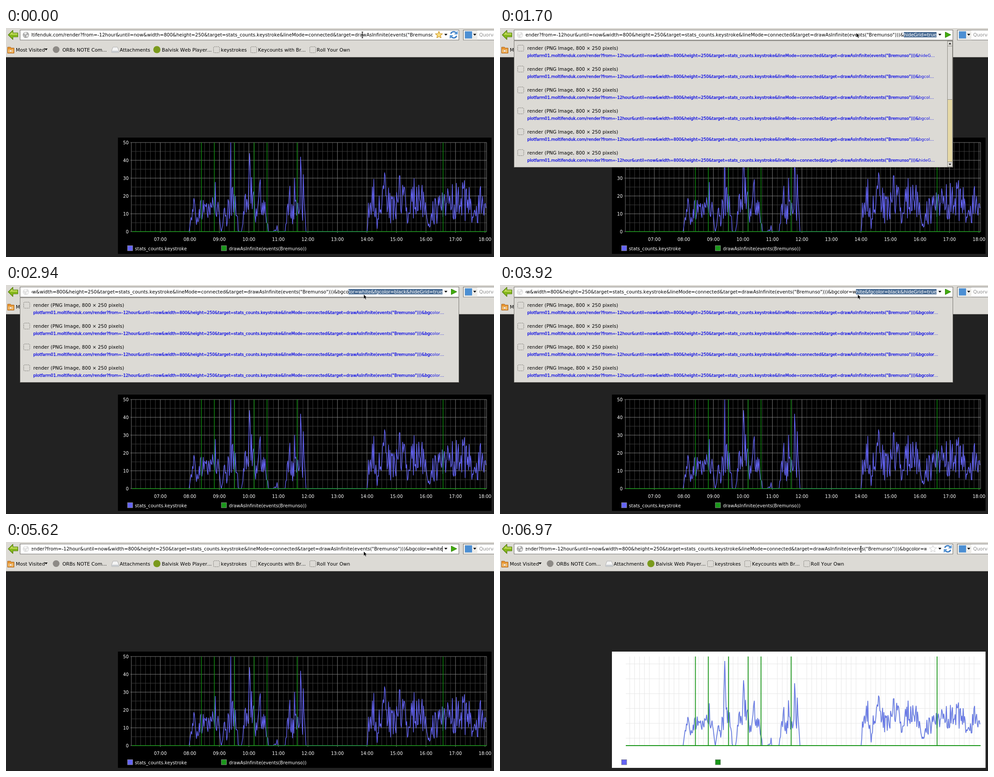
Animation, 1090 px wide and 514 px high, one loop 8 s. Source, as an HTML page:

```html
<!DOCTYPE html>
<html lang="en">
<head>
<meta charset="utf-8">
<title>Render URL editing</title>
<style>
  html, body { margin: 0; width: 100%; height: 100%; overflow: hidden; background: #222; }
  body { position: relative; font-family: "DejaVu Sans", sans-serif; font-kerning: none; font-variant-ligatures: none; }
  svg { position: absolute; left: 0; top: 0; }
  svg text { white-space: pre; }
  #url { position: absolute; left: 57px; top: 8px; height: 15px; overflow: hidden; font-size: 10.45px; line-height: 15px; color: #000; }
  #line { position: absolute; top: 0; white-space: pre; }
  #line .tail { letter-spacing: -.12px; }
  #line .sel { background: #4b6d94; color: #fff; }
  #caret { position: absolute; left: 974px; top: 9px; width: 1px; height: 13px; background: #000; }
  #pop { position: absolute; left: 31px; top: 28px; width: 981px; overflow: hidden; background: #dcdad5; box-shadow: inset 0 0 0 1px #77756f; }
  #pop div { position: absolute; left: 30px; line-height: 14px; white-space: pre; }
  #pop .title { font-size: 10.6px; color: #000; }
  #pop .addr { font-size: 9.117px; color: #0808e6; }
  #pop b { font-weight: 400; -webkit-text-stroke: .32px #0808e6; }
</style>
</head>
<body>
<svg id="stage" width="1090" height="514"></svg>
<div id="url"><span id="line"></span></div>
<div id="caret"></div>
<div id="pop"></div>
<svg id="mouse" width="1090" height="514">
  <path id="arrow" d="M0 0V10L2.3 8 4 11.6 5.7 10.8 4.1 7.4H7.2Z" stroke="#fff" stroke-width=".5"/>
  <path id="beam" d="M-2 -6.5H-.6L0 -6 .6 -6.5H2M0 -6V6M-2 6.5H-.6L0 6 .6 6.5H2" fill="none" stroke="#000" stroke-width="1.2"/>
</svg>
<script>
const LOOP = 8000;
const BASE = 'plotfarm01.moltifenduk.com/render?from=-12hour&until=now&width=800&height=250' +
  '&target=stats_counts.keystroke&lineMode=connected&target=drawAsInfinite(events("Bremunso")))';
const FULL = '&bgcolor=white&fgcolor=black&hideGrid=true';
const $ = id => document.getElementById(id);
const esc = s => s.replace(/&/g, '&amp;').replace(/</g, '&lt;');

// ---- drawing helpers
const rect = (x, y, w, h, fill, more = '') =>
  `<rect x="${x}" y="${y}" width="${w}" height="${h}" fill="${fill}" ${more}/>`;
const path = (d, fill, stroke = 'none', width = 1) =>
  `<path d="${d}" fill="${fill}" stroke="${stroke}" stroke-width="${width}" stroke-linejoin="bevel"/>`;
const label = (x, y, s, size, fill, anchor = 'start') =>
  `<text x="${x}" y="${y}" font-size="${size}" fill="${fill}" text-anchor="${anchor}">${esc(s)}</text>`;
const group = (id, s) => `<g id="${id}">${s}</g>`;
const down = (x, y) => path(`M${x - 3.5} ${y - 2}h7l-3.5 4.2z`, '#111');
const dashed = (x, y) =>
  rect(x + .5, y + .5, 13.5, 13.5, 'none', 'rx="2" stroke="#76746f" stroke-dasharray="2.4 1.4"');

function star(cx, cy, fill, stroke) {
  let d = '';
  for (let i = 0; i < 10; i++) {
    const r = i % 2 ? 3.7 : 8.3, a = Math.PI * (i / 5 - .5);
    d += (i ? 'L' : 'M') + (cx + r * Math.cos(a)).toFixed(2) + ' ' + (cy + r * Math.sin(a)).toFixed(2);
  }
  return path(d + 'Z', fill, stroke, 1.2);
}

// ---- chart
const LEFT = 280, RIGHT = 1073.5, TOP = 257, BOTTOM = 457;
const EVENTS = [436.5, 465.3, 510.5, 554.3, 583, 650.3, 976.3];

// Upper envelope as x, value pairs; seeded dips make the line jagged.
function series(peak, unit, depth) {
  const k = [409,0, 414,19, 418,21, 424,16, 432,18, 440,25, 444,18, 455,20, 460,28, 464,18, 467,30,
    472,18, 477,13, 481,0, 484,14, 493,13, 496,22, 499,20, 502,peak, 505,24, 511,33, 515,22, 519,0,
    527,0, 530,20, 536,28, 541,18, 544,44, 547,30, 554,28, 561,10, 568,31, 573,20, 580,20, 586,0,
    597,0, 604,2, 606,13, 607,0, 623,0, 633,28, 638,14, 645,31, 649,16, 654,16, 658,42, 661,24,
    664,31, 670,0, 807,0, 812,31, 822,30, 829,4, 836,28, 847,34, 862,19, 874,27, 886,35, 898,19,
    911,30, 930,27, 942,8, 953,17, 976,21, 988,24, 1004,26, 1024,28, 1036,24, 1048,11, 1060,29, 1074,15];
  let seed = 4711, i = 0, d = '';
  const random = () => (seed = seed * 16807 % 2147483647) / 2147483647;
  for (let x = 409; x <= 1073; x += 1.5) {
    while (k[i + 2] < x) i += 2;
    const f = (x - k[i]) / (k[i + 2] - k[i]);
    let v = k[i + 1] + (k[i + 3] - k[i + 1]) * f;
    const dip = random() * depth;
    if (v < 38) v *= 1.06 - dip;
    d += `L${x} ${(BOTTOM - v * unit).toFixed(1)}`;
  }
  return `M409 ${BOTTOM}` + d;
}

function chart(white) {
  const minor = white ? '#e6e6e6' : '#3c3c3c', hour = 65.93, rows = white ? 6 : 5;
  const step = (BOTTOM - TOP) / rows;
  let thin = '', thick = '', text = '';
  for (let n = -5; n < 67; n++) {
    const x = 344.7 + n * hour / 6;
    if (n % 6) {
      thin += `M${x.toFixed(1)} ${TOP}V${BOTTOM}`;
      continue;
    }
    thick += `M${x.toFixed(1)} ${TOP}V${BOTTOM + 3}`;
    text += label(x, 478, String(n / 6 + 7).padStart(2, '0') + ':00', 9.9, '#fff', 'middle');
  }
  for (let r = 0; r <= rows; r++) {
    const y = BOTTOM - r * step;
    thick += `M${LEFT - 2} ${y}H${RIGHT}`;
    text += label(274, y + 3.5, String(r * 10), 9.9, '#fff', 'end');
    if (r < rows) thin += `M${LEFT + 1} ${y - step / 2}H${RIGHT}`;
  }
  thick += `M${LEFT} ${TOP}V${BOTTOM}M${RIGHT} ${TOP}V${BOTTOM}`;
  const line = series(white ? 57 : 50, step / 10, white ? .65 : .85);
  const edge = `stroke="${white ? '#777' : '#999'}" stroke-width=".8"`;
  return rect(250, 246, 834.5, 261, white ? '#fff' : '#000') +
    path(thin, 'none', minor) +
    (white ? path(line, 'none', '#a5bfdc', 2.2) : path(thick, 'none', '#8c8c8c', .9) + text) +
    path(line, 'none', white ? '#5c66ea' : '#6464f4', white ? 1.1 : 1.4) +
    path(`M${LEFT + 1} ${BOTTOM}H${RIGHT}` + EVENTS.map(x => `M${x} ${TOP}V${BOTTOM}`).join(''),
      'none', white ? '#159415' : '#119411', white ? 1.8 : 1.4) +
    rect(271.5, 488.5, 11.5, 11.5, '#6464f4', edge) + rect(481, 488.5, 11.5, 11.5, '#1a961a', edge) +
    (white ? '' : label(288, 498.5, 'stats_counts.keystroke', 10.08, '#fff') +
      label(498, 498.5, 'drawAsInfinite(events(Bremunso))', 10.08, '#fff'));
}

// ---- browser frame
function toolbar() {
  const arc = 'M993.5 13a6.8 6.8 0 0 1 11.5 -2.6M1006.5 17.5a6.8 6.8 0 0 1 -11.5 2.6';
  const marks = [[22, 'Most Visited'], [126, 'ORBs NOTE Com...'], [254, 'Attachments'],
    [348, 'Balvisk Web Player...'], [480, 'keystrokes'], [563, 'Keycounts with Br...'], [694, 'Roll Your Own']];
  return rect(0, 0, 1090, 65, '#dcdad5') + rect(0, 65, 1090, 1, '#8b8983') +
    path('M5 15.5L15.5 5V11H26.5V20H15.5V26Z', '#86b81c', '#55800f', 1.2) +
    path('M8 15L14.5 8.5V12.3H25.3V15Z', '#c3da5c') +
    rect(31.5, 4.5, 980, 22.5, '#fff', 'stroke="#6f6d68"') +
    group('globe', '<circle cx="44.500" cy="15.500" r="7" fill="#a9a9a9"/>' +
      path('M40 11l4 -2 3 2 -2 3 -3 1zM45 16l4 -1 1 3 -4 3zM39 16l3 2 -1 2z', '#e8e8e8')) +
    group('starOn', star(967, 15.5, '#fbdc7c', '#c9962b')) +
    group('starOff', star(967, 15.5, '#fdfdfd', '#d4d4d4')) +
    down(982.5, 15) +
    group('reload', path(arc, 'none', '#3f7fc4', 3) + path('M1008.5 7v7h-7zM991.5 23.500v-7h7z', '#5a9ad8', '#3f7fc4', .6)) +
    group('go', path('M994.5 9L1007 15.200 994.5 21.500Z', '#43ab10', '#2d7f08')) +
    rect(1021.5, 4.5, 80, 22.5, '#fff', 'stroke="#6f6d68"') + rect(1022, 5, 31, 21.5, '#eeedea') +
    rect(1025, 7.5, 16, 16, '#4c8fd3') + down(1047, 15) +
    label(1057, 19, 'Quorva', 10.45, '#8a8a8a') +
    path('M3.5 43H10l1.500 2H18v11.500H3.500Z', '#e8952f', '#a8621a') +
    path('M5 48h11v7H5z', '#f6c77c') + rect(8, 49.5, 5, 4, '#fff', 'stroke="#b8732a" stroke-width=".8"') +
    down(89.5, 48) +
    '<circle cx="112" cy="48.500" r="7.500" fill="#8d8a86"/>' +
    path('M236 51l3 -8h10l3 8v4h-16z', '#f4f4f4', '#a3a3a3', .8) + path('M236 51h16v4h-16z', '#c9ccd0') +
    '<circle cx="337" cy="48.500" r="8" fill="#7a9a1c"/>' +
    dashed(463, 41.5) + dashed(546, 41.5) + dashed(678, 41.5) +
    marks.map(([x, s]) => label(x, 52.5, s, 10.64, '#000')).join('');
}

$('stage').innerHTML = rect(0, 0, 1090, 514, '#222') +
  group('dark', chart(false)) + group('light', chart(true)) + toolbar();

// ---- timeline: each step changes part of the state
const STEPS = [
  [0, { tail: '', typed: 0, end: 972, rows: 0, emph: 0, edit: false, grey: false, light: false }],
  [290, { end: 953 }],
  [1490, { tail: '&', typed: 1, end: 975, edit: true }],
  [1560, { tail: '&hideGrid=true' }],
  [1630, { rows: 6 }],
  [2030, { tail: FULL, typed: 2 }],
  [2170, { rows: 4 }],
  [2240, { emph: 1 }],
  [2310, { typed: 3 }],
  [2550, { emph: 2 }],
  [2730, { typed: 4 }],
  [2820, { typed: 5 }],
  [2880, { emph: 3 }],
  [2950, { typed: 6 }],
  [3020, { emph: 4 }],
  [3170, { typed: 7 }],
  [3210, { emph: 5 }],
  [3350, { typed: 8 }],
  [3450, { emph: 7 }],
  [3680, { typed: 9 }],
  [3820, { typed: 10 }],
  [4010, { typed: 11 }],
  [4160, { typed: 12 }],
  [4200, { typed: 13 }],
  [4310, { typed: 14 }],
  [4780, { tail: '&bgcolor=white' }],
  [5620, { rows: 0 }],
  [5670, { edit: false, grey: true }],
  [5850, { light: true }],
  [6910, { grey: false }]
];
const states = [];
STEPS.forEach(([, change], i) => states.push({ ...states[i - 1], ...change }));

function popup(rows, emph) {
  let s = '', art = '';
  for (let i = 0; i < rows; i++) {
    const y = 17 + i * 46.9;
    const tail = rows === 4 ? 'bgcolor' : i % 5 ? 'bgcol' : 'hideG';
    s += `<div class="title" style="top:${y - 7}px">render (PNG Image, 800 × 250 pixels)</div>` +
      `<div class="addr" style="top:${y + 10.3}px"><b>${esc(BASE + '&' + tail.slice(0, emph))}</b>${tail.slice(emph)}…</div>`;
    art += dashed(8, 10 + i * 46.9);
  }
  if (rows === 6) {
    const box = 'stroke="#8b8983"';
    art += rect(968.5, 1.5, 11, 282, '#e6d9a6', box) + rect(968.5, 1.5, 11, 11, '#dcdad5', box) +
      rect(968.5, 12.5, 11, 120, '#dcdad5', box) + rect(968.5, 272.5, 11, 11, '#dcdad5', box) +
      path('M971 8.500h6l-3 -3.500zM971 276.500h6l-3 3.500z', '#111');
  }
  return `<svg width="981" height="285">${art}</svg>` + s;
}

const show = (id, on) => { $(id).style.display = on ? '' : 'none'; };

function apply(s) {
  const clip = s.edit ? 975 : 953;
  const kept = esc(s.tail.slice(0, s.typed)), rest = esc(s.tail.slice(s.typed));
  $('url').style.width = clip - 57 + 'px';
  $('url').style.color = s.grey ? '#7d7d7d' : '#000';
  $('line').style.right = clip - s.end + 'px';
  $('line').innerHTML = esc(BASE) + `<span class="tail">${kept}<span class="sel">${rest}</span></span>`;
  show('caret', s.edit && !rest);
  show('go', s.edit);
  show('reload', !s.edit);
  show('starOn', !s.edit && !s.tail);
  show('starOff', !s.edit && s.tail);
  $('globe').style.opacity = s.edit ? .35 : 1;
  show('dark', !s.light);
  show('light', s.light);
  show('pop', s.rows);
  $('pop').style.height = (s.rows === 6 ? 285 : 191) + 'px';
  $('pop').innerHTML = popup(s.rows, s.emph);
}

function pointer(t) {
  let x = 796, y = 15.5, beam = t < 1490;
  if (!beam && t < 2030) y = 11;
  else if (!beam) {
    const k = t < 6630 ? 0 : Math.min(1, Math.floor((t - 6630) / 56.6 + 1) / 7);
    x = 799 + 7 * k;
    y = 21 - 5 * k;
    beam = t >= 6690;
  }
  show('beam', beam);
  show('arrow', !beam);
  $(beam ? 'beam' : 'arrow').setAttribute('transform', `translate(${x} ${y})`);
}

let current = -1;
function frame() {
  const t = performance.now() % LOOP;
  let i = STEPS.length - 1;
  while (STEPS[i][0] > t) i--;
  if (i !== current) apply(states[current = i]);
  pointer(t);
  requestAnimationFrame(frame);
}
frame();
</script>
</body>
</html>
```
